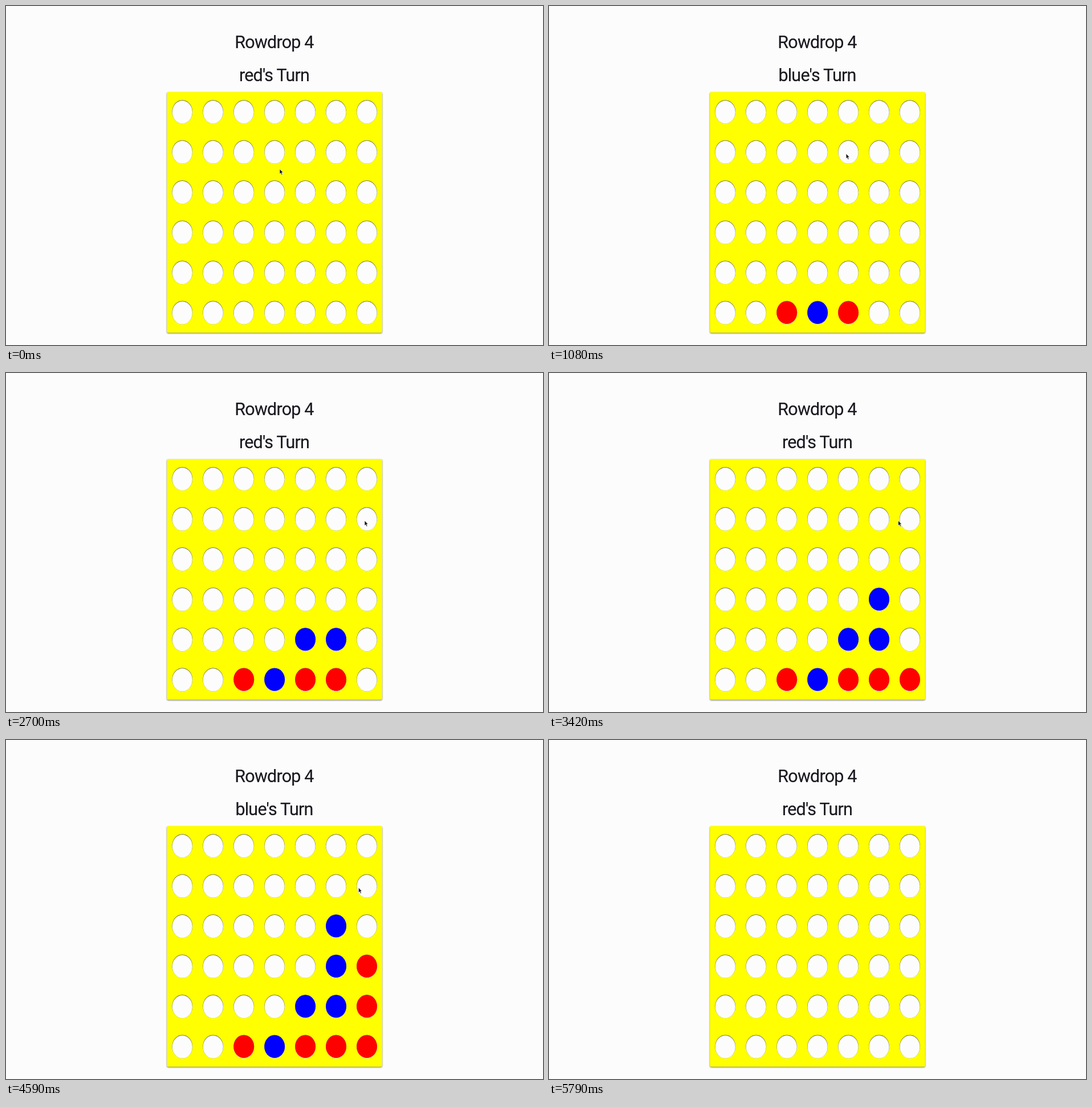
These frames come from a looping animation (942x595 px, 5910 ms). An HTML page:

```html
<!DOCTYPE html>
<html lang="en">
<head>
<meta charset="utf-8">
<title>Rowdrop 4</title>
<style>
  html, body { margin: 0; width: 100%; height: 100%; overflow: hidden; background: #fcfcfd; }
  svg { display: block; width: 942px; height: 595px; }
  text {
    font: 400 30.5px Roboto, Arial, sans-serif;
    letter-spacing: -0.8px;
    text-anchor: middle;
    fill: #1b1b20;
    filter: drop-shadow(0 0.8px 0.5px rgba(30, 30, 60, .55));
  }
  .board { fill: #ff0; filter: drop-shadow(0 1px 0.8px rgba(0, 0, 0, .55)); }
  .rim { fill: #7c7c50; }
  .hole { fill: #fcfcfd; }
  .red { fill: #f00; }
  .blue { fill: #00f; }
</style>
</head>
<body>
<svg viewBox="0 0 942 595">
  <text x="470.5" y="74">Rowdrop 4</text>
  <text id="turn" x="470.5" y="132">red's Turn</text>
  <rect class="board" x="282.3" y="151" width="377.5" height="422.5" rx="2.5"/>
  <g id="holes"></g>
  <g id="discs"></g>
  <path id="cursor" d="M0 0V9L2 7.2L3.4 10.4L5 9.7L3.6 6.6H6.2Z"
        fill="#111" stroke="#fff" stroke-width=".7"/>
</svg>
<script>
const LOOP = 5910, RESET = 5310, COLS = 7, ROWS = 6;
const FIRST_MOVE = 150, MOVE_GAP = 430;
const PLAYED_COLUMNS = '234455656565';
const $ = id => document.getElementById(id);

function ellipse(parent, cls, cx, cy, rx, ry) {
  const el = document.createElementNS('http://www.w3.org/2000/svg', 'ellipse');
  const attrs = { class: cls, cx, cy, rx, ry };
  for (const key in attrs) el.setAttribute(key, attrs[key]);
  return parent.appendChild(el);
}

const colX = c => 309.3 + 53.95 * c;
const rowY = r => 185.6 + 70.5 * r;

for (let r = 0; r < ROWS; r++) {
  for (let c = 0; c < COLS; c++) {
    ellipse($('holes'), 'rim', colX(c), rowY(r), 18, 20.6);
    ellipse($('holes'), 'hole', colX(c), rowY(r) + 0.6, 17.6, 20.1);
  }
}

// Players alternate, red first; each disc lands on top of its column.
const height = Array(COLS).fill(0);
const moves = [...PLAYED_COLUMNS].map((digit, i) => {
  const col = +digit, row = ROWS - 1 - height[col]++;
  const el = ellipse($('discs'), i % 2 ? 'blue' : 'red', colX(col), rowY(row), 18, 20);
  return { time: FIRST_MOVE + MOVE_GAP * i, x: colX(col) - 4, y: 259, el };
});

// The pointer visits every played column, rests, then leaves at the top right.
const lastMove = moves[moves.length - 1];
const stops = [
  { time: 0, x: 480, y: 286 },
  ...moves,
  { ...lastMove, time: RESET },
  { time: RESET + 300, x: 864, y: 22 }
];
const LEAVE = stops[stops.length - 1].time;

function glide(u) {
  const v = Math.min(1, Math.max(0, (u - 0.1) / 0.8));
  return v * v * (3 - 2 * v);
}

function pointerAt(t) {
  const i = stops.findIndex(s => s.time > t);
  const a = stops[i - 1], b = stops[i];
  const k = glide((t - a.time) / (b.time - a.time));
  return [a.x + (b.x - a.x) * k, a.y + (b.y - a.y) * k];
}

function draw(t) {
  let played = 0;
  for (const { time, el } of moves) {
    const shown = t >= time && t < RESET;
    el.style.display = shown ? '' : 'none';
    played += shown;
  }
  $('turn').textContent = (played % 2 ? 'blue' : 'red') + "'s Turn";
  $('cursor').style.display = t < LEAVE ? '' : 'none';
  if (t < LEAVE) $('cursor').setAttribute('transform', `translate(${pointerAt(t)})`);
}

const start = performance.now();
function tick() {
  draw((performance.now() - start) % LOOP);
  requestAnimationFrame(tick);
}
tick();
</script>
</body>
</html>
```
